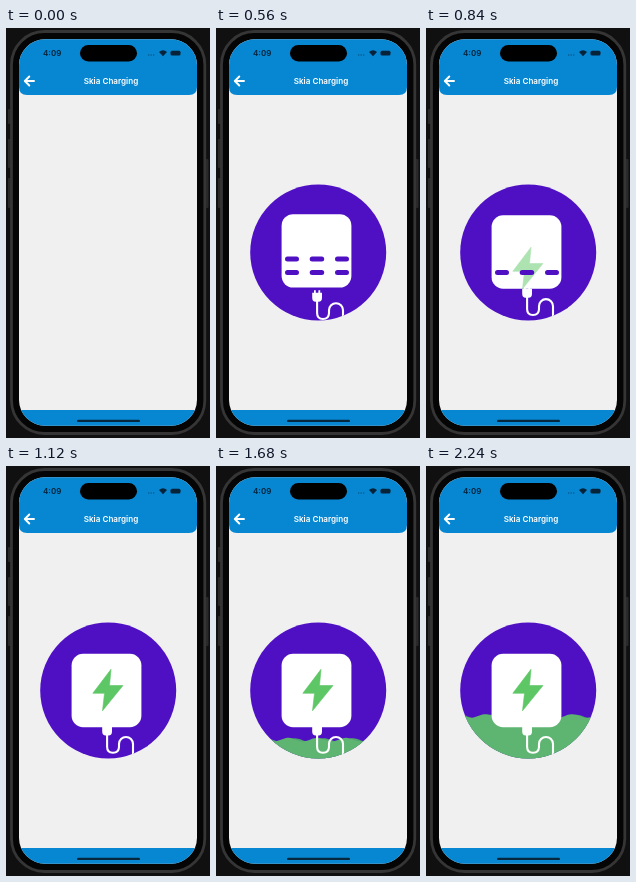
An HTML page that plays this animation: 204 px wide and 410 px high, repeating every 3.92 s.

```html
<!DOCTYPE html>
<html lang="en">
<head>
<meta charset="utf-8">
<title>Skia Charging</title>
<style>
  html, body { margin: 0; width: 100%; height: 100%; overflow: hidden; background: #101010; }
  svg { display: block; width: 100%; height: 100%; }
  text { font-family: Inter, "Liberation Sans", sans-serif; font-weight: 600; }
</style>
</head>
<body>
<svg viewBox="0 0 204 410">
  <defs>
    <clipPath id="screen"><rect x="13" y="11.3" width="178" height="386.4" rx="26"/></clipPath>
    <clipPath id="disc"><circle cx="102.2" cy="224.5" r="68"/></clipPath>
  </defs>

  <!-- phone body -->
  <g fill="#292929">
    <rect x="2" y="81" width="3" height="15" rx="1"/>
    <rect x="2" y="111" width="3" height="29" rx="1"/>
    <rect x="2" y="150" width="3" height="30" rx="1"/>
    <rect x="199.5" y="131" width="3" height="49" rx="1"/>
  </g>
  <rect x="5.5" y="3.5" width="193.3" height="402" rx="33" fill="#050505" stroke="#353535" stroke-width="2.8"/>

  <g clip-path="url(#screen)">
    <rect x="13" y="11" width="179" height="388" fill="#f0f0f0"/>
    <path d="M13 11H191V59Q191 67 183 67H21Q13 67 13 59Z" fill="#0787d2"/>
    <rect x="13" y="382" width="179" height="17" fill="#0787d2"/>
  </g>
  <rect x="74" y="17" width="57" height="16.5" rx="8.25" fill="#000"/>
  <rect x="71" y="391.7" width="63" height="2.4" rx="1.2" fill="#06283f"/>

  <!-- status bar -->
  <g fill="#06233a">
    <text x="37" y="28.2" font-size="8">4:09</text>
    <path d="M142 26.5h1.3v1h-1.3zM144.5 26.5h1.3v1h-1.3zM147 26.5h1.3v1h-1.3z" opacity=".6"/>
    <path d="M153 24Q157 20.5 161 24L157 28.2Z"/>
    <rect x="164.5" y="22.8" width="10" height="4.8" rx="1.5"/>
  </g>
  <path d="M28 53H19M23.3 48.5L18.8 53L23.3 57.5" fill="none" stroke="#fff" stroke-width="1.9" stroke-linecap="round" stroke-linejoin="round"/>
  <text x="105" y="56" font-size="8.1" fill="#fff" text-anchor="middle">Skia Charging</text>

  <g id="charger">
    <circle cx="102.2" cy="224.5" r="68" fill="#4f10c4"/>
    <g clip-path="url(#disc)">
      <path id="backWave" fill="#52a36c"/>
      <path id="frontWave" fill="#5eb471"/>
      <g id="cable">
        <path d="M98 258h1.8v5h-1.8zM102.4 258h1.8v5h-1.8zM96.2 260.5h9.8v5q0 4-3.5 4h-2.8q-3.5 0-3.5-4z" fill="#fff"/>
        <path d="M101.1 268V280.8Q101.1 286.8 107 286.8T113 280.8V278a7 7 0 0 1 14 0V293" fill="none" stroke="#fff" stroke-width="2.1"/>
      </g>
    </g>
    <rect id="box" x="65.6" width="69.8" height="73.4" rx="11.5" fill="#fff"/>
    <path id="bolt" d="M105 203.3L86.8 227.3H98.5L96.5 244.8L117 219.5H103.5Z" fill="#5dc766" stroke="#5dc766" stroke-width=".6" stroke-linejoin="round"/>
    <g fill="none" stroke="#4f10c4" stroke-width="5" stroke-linecap="round">
      <path id="upper" d="M71.5 231h9M96.2 231h9.5M121.5 231h9"/>
      <path id="lower" d="M71.5 244.5h9M96.2 244.5h9.5M121.5 244.5h9"/>
    </g>
  </g>
</svg>
<script>
const LOOP = 3920, STEP = 140;
const el = id => document.getElementById(id);
const part = (t, from, to) => Math.min(1, Math.max(0, (t - from) / (to - from)));
const shift = (id, y) => el(id).setAttribute("transform", `translate(0 ${y})`);

function wave(id, level, phase) {
  let d = "M34 294";
  for (let x = 34; x <= 172; x += 1.5)
    d += `L${x} ${(level + 1.8 * Math.sin(x / 4.6 + phase)).toFixed(2)}`;
  el(id).setAttribute("d", d + "L172 294Z");
}

function draw(t) {
  el("charger").style.display = t < 280 ? "none" : "";

  el("cable").style.display = t < 420 ? "none" : "";
  shift("cable", 21 * 0.2 ** ((t - 420) / STEP));
  el("box").setAttribute("y", 186.2 + 1.6 * part(t, 560, 980));

  const rise = part(t, 560, 1120);
  el("bolt").setAttribute("opacity", rise);
  shift("bolt", 32 * (1 - rise));

  el("upper").setAttribute("opacity", 1 - part(t, 560, 840));
  el("lower").setAttribute("opacity", t < 980 ? 1 : 0);

  const fill = part(t, 1260, 2240);
  const level = 296 - 46 * fill ** 0.85;
  wave("backWave", level + 0.5, 2.2 - 5 * fill);
  wave("frontWave", level, 5 * fill - 0.6);
}

function tick() {
  const t = performance.now() % LOOP;
  draw(Math.floor(t / STEP) * STEP);
  requestAnimationFrame(tick);
}
tick();
</script>
</body>
</html>
```
